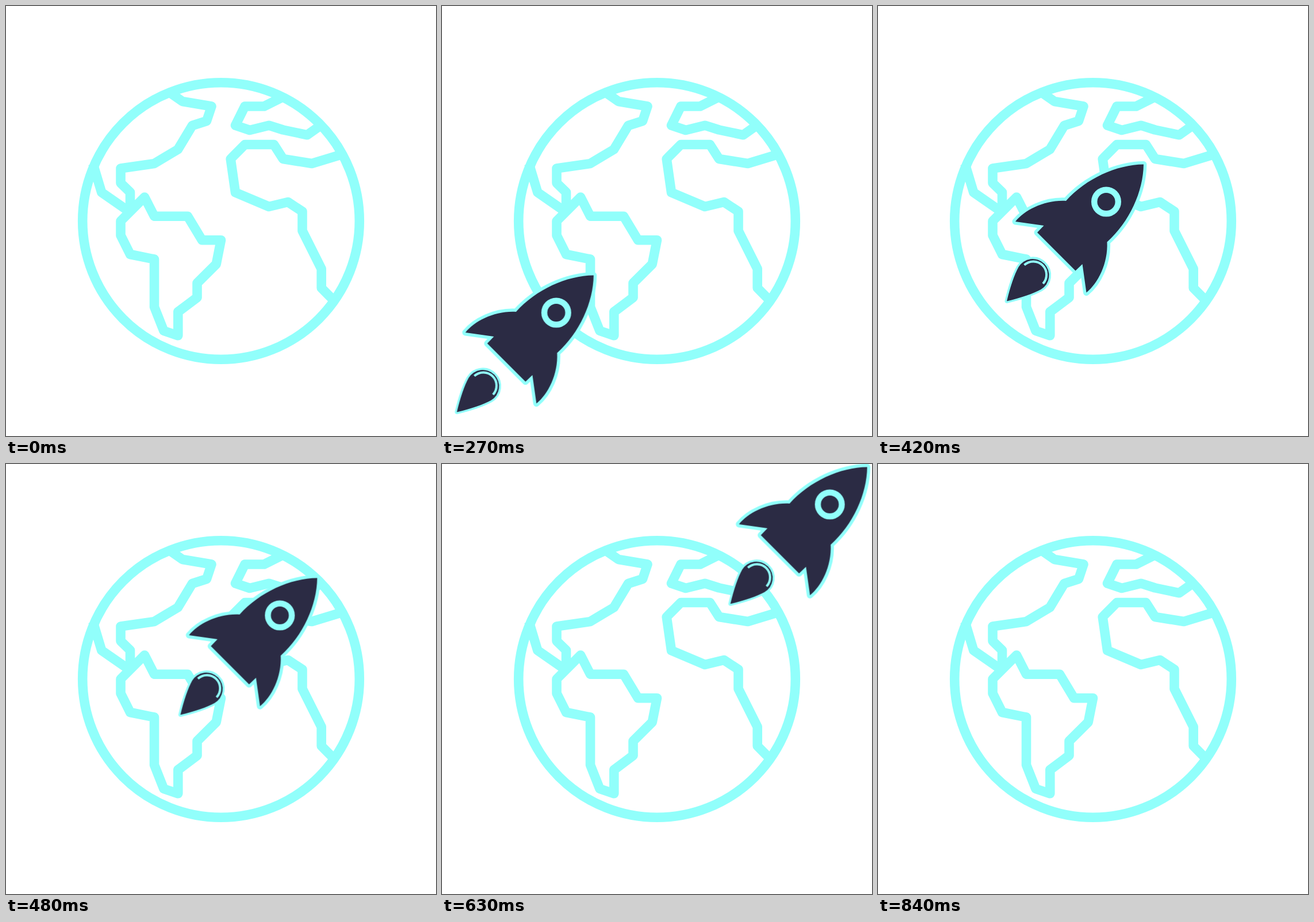
Write an HTML page that moves like this. It is 748 px wide and 748 px high and loops after 0.9 s.

```html
<!DOCTYPE html>
<html lang="en">
<head>
<meta charset="utf-8">
<title>Rocket passing a globe</title>
<style>
  html, body { margin: 0; width: 100%; height: 100%; overflow: hidden; background: #fff; }
  svg { display: block; width: 100vw; height: 100vh; }
  .globe { fill: none; stroke: #91fffb; stroke-width: 16.6; stroke-linejoin: round; }
  .hull { fill: #2b2b44; stroke: #91fffb; stroke-linejoin: round; paint-order: stroke; }
  .trim { fill: none; stroke: #91fffb; }
</style>
</head>
<body>
<svg viewBox="0 0 748 748">
  <g class="globe">
    <circle cx="374" cy="374" r="240.8"/>
    <!-- North America -->
    <path d="M284 150 307 166 357.5 174.5 349 200 324 208 299 249.5 258 274 199.5 282.5V308L216 324V352"/>
    <path d="M151.3 274.5 166.3 324.3 212 356"/>
    <!-- South America -->
    <path d="M241 332.5 258 365.7H316L341 407.2H374L365.7 449 332.5 482V507L299.3 532V573.3L274.4 565 258 523.5V440.5L216 432 199.5 399V374Z"/>
    <!-- Europe -->
    <path d="M482 158 449 174.5H415.5L399 207.7 424 216 457.3 207.7 482 215.5 524 224.3 547 208"/>
    <!-- Africa -->
    <path d="M583 258.5 532 274 482 266 466 241H415.5L390.7 266 399 324.3 457.3 349 490.5 341 515.5 357.5V391L548.7 457.3V490.5L570 512"/>
  </g>
  <g id="rocket">
    <path class="hull" stroke-width="11" d="M462 275.5C415 276 362 300 327 339C290 337 255 355 239 375L288.5 382 277 394 343.5 460.5 355.5 449 362.5 498.5C382.5 482.5 400.5 447.5 398.5 410.5C437.5 375.5 461.5 322.5 462 275.5Z"/>
    <circle class="trim" cx="397" cy="340.5" r="20.8" stroke-width="10.4"/>
    <path class="hull" stroke-width="7" d="M224 513.5C230 488 237 468 244.5 454A28.5 28.5 0 1 1 283.5 493C269.5 500.5 249.5 507.5 224 513.5Z"/>
    <path class="trim" stroke-width="4" d="M254.5 450.5A23 23 0 0 1 287 483"/>
  </g>
</svg>
<script>
  const STEPS = 30, STEP_MS = 30, DX = 39.66, DY = -38.6;
  const at = n => ({ transform: `translate(${n * DX}px, ${n * DY}px)` });

  // The rocket is drawn where it stands after 14 steps.
  document.getElementById('rocket').animate([at(-14), at(STEPS - 14)], {
    duration: STEPS * STEP_MS,
    iterations: Infinity,
    easing: `steps(${STEPS}, end)`
  });
</script>
</body>
</html>
```
